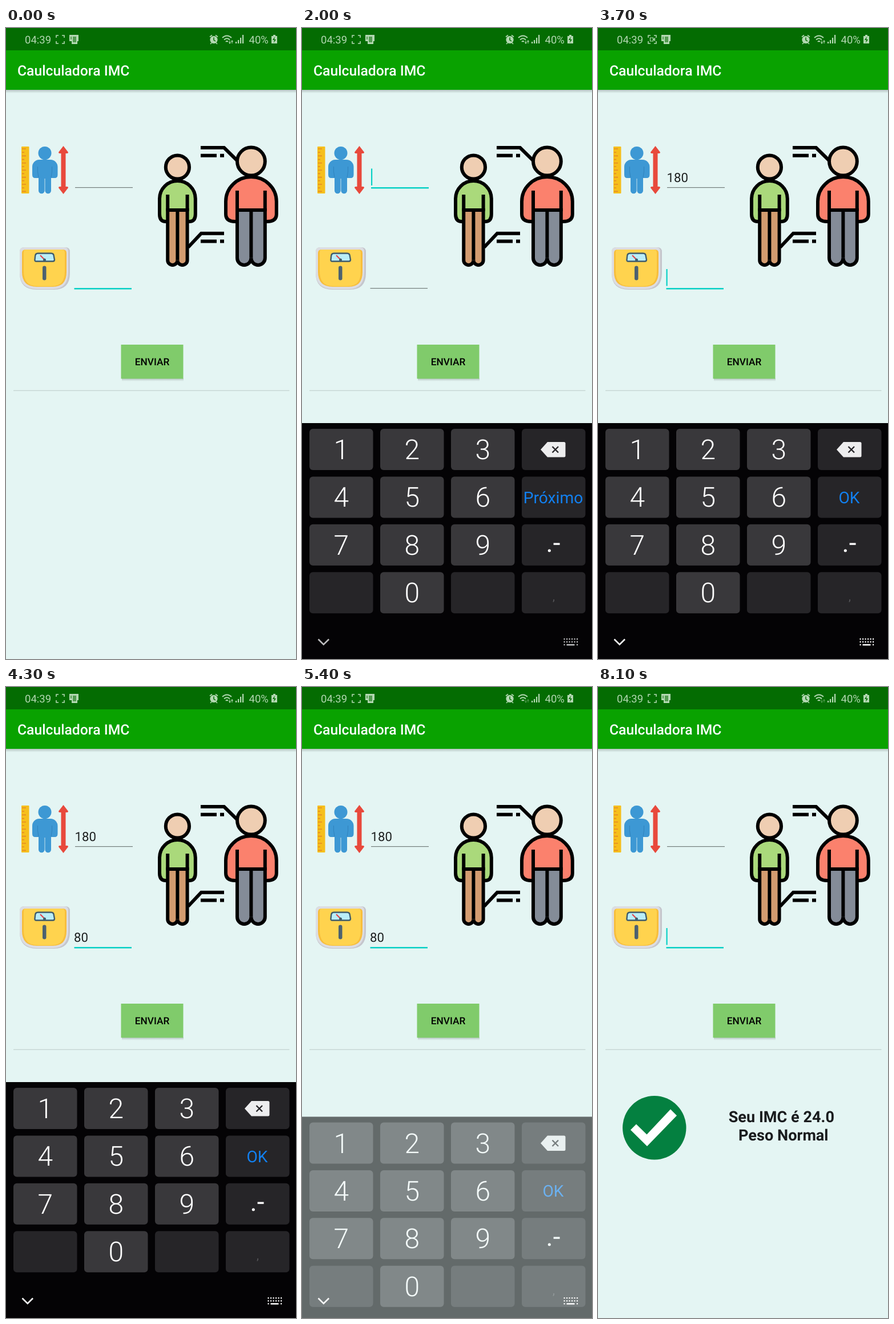
An HTML page that plays this animation: 508 px wide and 1102 px high, repeating every 8500 ms.

```html
<!DOCTYPE html>
<html lang="pt">
<head>
<meta charset="utf-8">
<title>Calculadora</title>
<style>
html, body { margin: 0; width: 100%; height: 100%; overflow: hidden; background: #e4f5f3; }
svg { display: block; width: 100vw; height: 100vh; }
text { font-family: Roboto, "Open Sans", sans-serif; text-rendering: geometricPrecision; white-space: pre; }
.mid { text-anchor: middle; }
.ink { fill: none; stroke: #000; stroke-width: 6; }
.status { fill: #b3d8b2; }
.status-line { fill: none; stroke: #b3d8b2; stroke-width: 1.6; }
.input { font-size: 22.2px; fill: #1c1f1f; }
.result { font-size: 27.1px; font-weight: 700; fill: #1a1c1e; text-anchor: middle; }
.digit { font-size: 48px; font-weight: 300; fill: #fff; text-anchor: middle; }
.action { font-size: 28.2px; fill: #1280f0; text-anchor: middle; }
</style>
</head>
<body>
<svg viewBox="0 0 508 1102" preserveAspectRatio="none">
  <defs>
    <linearGradient id="drop" x2="0" y2="1">
      <stop offset="0" stop-color="#000" stop-opacity=".2"/>
      <stop offset="1" stop-color="#000" stop-opacity="0"/>
    </linearGradient>
  </defs>
  <rect width="508" height="1102" fill="#e4f5f3"/>

  <!-- bars -->
  <rect y="108" width="508" height="6" fill="url(#drop)"/>
  <rect y="39" width="508" height="69" fill="#09a200"/>
  <rect width="508" height="39" fill="#046c02"/>
  <text x="20" y="83" font-size="24.7" font-weight="500" fill="#fff">Caulculadora IMC</text>
  <g class="status">
    <text x="33" y="27" font-size="18.5">04:39</text>
    <text x="425.5" y="27" font-size="18.5">40%</text>
    <path d="M111 12h16v11h-2v5h-10v-5h-4z"/>
    <path d="M113 15h2v5h-2zM117 15h6v10h-6z" fill="#046c02" opacity=".55"/>
    <circle cx="364" cy="20.5" r="6.6"/>
    <path d="M402 24h2.2v3H402zM406 21h2.2v6H406zM410 17h2.2v10H410zM414 12h2.2v15H414z"/>
    <path d="M468 12h4v2h3v13h-10V14h3z"/>
  </g>
  <path d="M364 16.500v4.500l3 2" fill="none" stroke="#046c02" stroke-width="1.500"/>
  <path d="M471 15l-4 6h3l-1 5 4-6h-3z" fill="#046c02"/>
  <g class="status-line">
    <path d="M88 17v-4h4M98 13h4v4M102 23v4h-4M92 27h-4v-4"/>
    <path d="M357 15.500l4-3M371 15.500l-4-3M360 26l-2 2M368 26l2 2"/>
    <path d="M379 17q8-7 16 0M382 20.500q5-4.500 10 0M385 24q2-2 4 0" stroke-width="2"/>
    <path id="arrows" d="M392 22v5m-1.500-2l1.500 2 1.500-2M396 27v-5m-1.500 2l1.500-2 1.500 2" stroke-width="1.100"/>
    <path id="rec" d="M91.500 17h5v6h-5zM97 20l2.500-2v4z" stroke-width="1.200"/>
  </g>

  <!-- height icon -->
  <rect x="27" y="207" width="13.500" height="82" rx="1" fill="#f6bf1c"/>
  <path id="ticks" stroke="#e58a25" stroke-width="1.600"/>
  <g fill="#3d98d4">
    <circle cx="68" cy="218.500" r="11.500"/>
    <path d="M58 230H78a12.500 12.500 0 0 1 12.500 12.500V256q0 6-5 6H79V284a5.300 5.300 0 0 1-10.600 0V263h-.8V284a5.300 5.300 0 0 1-10.600 0V262H51q-5 0-5-6V242.500A12.500 12.500 0 0 1 58 230z"/>
  </g>
  <path d="M55.500 242v9l1.500 10M80.500 242v9l-1.500 10" fill="none" stroke="#2f83bd" stroke-width="1"/>
  <path d="M100.500 206l8.500 11q0 2-2 2h-2.500v58h2.500q2 0 2 2l-8.500 11-8.500-11q0-2 2-2h2.500v-58H94q-2 0-2-2z" fill="#e8493c"/>

  <!-- scale icon -->
  <path d="M32 383H104q8 0 8 8V428q0 29-28 29H54q-30 0-30-29V391q0-8 8-8z" fill="#c5c6cd"/>
  <path d="M32 383H102q7 0 7 8V426q0 29-26 30H54q-30-1-30-29V391q0-8 8-8z" fill="#dcdde2"/>
  <path d="M34 387H100q6 0 6 6V426q0 26-24 26H54q-26 0-26-26V393q0-6 6-6z" fill="#f7be3c"/>
  <path d="M34 387H98q5 0 5 6V425q0 26-23 26H55q-24 0-24-26V393q0-6 3-6z" fill="#ffd34e"/>
  <path d="M56 393.500H79q5 0 5 6l1 5q0 3-3 3H53q-3 0-2.500-3l.5-5q0-6 5-6z" fill="#b9edf8" stroke="#3f5c6c" stroke-width="2.400"/>
  <path d="M60 397l8 8" stroke="#e3434a" stroke-width="2.200"/>
  <circle cx="67.500" cy="405" r="2.500" fill="#3f5c6c"/>
  <rect x="64" y="415.500" width="6.500" height="25" rx="3.200" fill="#4c6170"/>

  <!-- two figures -->
  <g id="people"></g>
  <path class="ink" d="M341 209H382L406 232.500M341 222.800h28M375 222.800h7M319 383L342 358.800H382M341 372.600h28M375 372.600h7"/>

  <!-- form -->
  <rect id="line0" x="121" width="101"/>
  <rect id="line1" x="119.500" width="100.500"/>
  <text id="field0" class="input" x="120.500" y="269"></text>
  <text id="field1" class="input" x="119" y="445"></text>
  <rect id="cursor" width="2.200" height="29.500" fill="#08d0c5"/>
  <rect x="203" y="612" width="108" height="5" fill="url(#drop)"/>
  <rect id="send" x="201.500" y="553" width="109" height="59.500"/>
  <text class="mid" x="256" y="589" font-size="17.260" font-weight="500">ENVIAR</text>
  <rect x="13" y="632.600" width="483.500" height="1.300" fill="#c5d4d1"/>

  <g id="result">
    <circle cx="98.800" cy="769.800" r="55.700" fill="#048040"/>
    <path d="M57 773.500L67 763.500 85.500 781.500 127 737.500 138 748.500 86 802z" fill="#fff"/>
    <text class="result" x="321.300" y="760">Seu IMC é 24.0</text>
    <text class="result" x="324.800" y="791.500">Peso Normal</text>
  </g>

  <!-- keyboard -->
  <g id="board">
    <rect y="690" width="508" height="560" fill="#040305"/>
    <g id="keys"></g>
    <path d="M418 736.300L430 723H459q2.500 0 2.500 2.500V747q0 2.500-2.500 2.500H430z" fill="#ededee"/>
    <path d="M438.500 731l10.500 10.500M449 731l-10.500 10.500" stroke="#262528" stroke-width="2.400"/>
    <text id="next" class="action" x="440" y="829.500"></text>
    <text class="digit" x="440" y="915" style="font-size:46px;font-weight:400">.-</text>
    <text class="mid" x="441" y="1000" font-size="20" fill="#57565a">,</text>
  </g>
  <g id="nav">
    <rect id="hide" x="10" y="1042" width="55" height="60" rx="18" fill="#353438"/>
    <path id="chevron" d="M28.500 1067.500l9.300 9.200 9.300-9.200" fill="none" stroke="currentColor" stroke-width="2.600"/>
    <path id="dots" fill="currentColor"/>
  </g>
</svg>
<script>
const LOOP = 8500;
const $ = id => document.getElementById(id);
const show = (id, on) => { $(id).style.display = on ? '' : 'none'; };
const set = (id, attrs) => { for (const k in attrs) $(id).setAttribute(k, attrs[k]); };
const within = (t, spans) => spans.some(([a, b]) => t >= a && t < b);

// A figure: centre, head y and radius, shoulder top, half widths of body and legs.
function figure({ x, headY, headR, top, half, leg, rise, arm, skin, shirt, pants }) {
  const l = x - half, r = x + half, a = x - leg, b = x + leg, foot = leg / 2;
  const body = `M${a} 338h-3.500Q${l} 338 ${l} 325V${top + rise}A${half} ${rise} 0 0 1 ${r} ${top + rise}V325Q${r} 338 ${b + 3.5} 338H${b}`;
  const legs = `M${a} 318H${b}V${414 - foot}a${foot} ${foot} 0 0 1 ${-leg} 0a${foot} ${foot} 0 0 1 ${-leg} 0z`;
  return `<path d="${body}z" fill="${shirt}"/><path class="ink" d="${body}"/>
    <path class="ink" style="fill:${pants}" d="${legs}"/>
    <path class="ink" d="M${x} 318V${414 - foot}M${a} ${arm}V320M${b} ${arm}V320"/>
    <circle class="ink" style="fill:${skin}" cx="${x}" cy="${headY}" r="${headR}"/>`;
}
$('people').innerHTML =
  figure({ x: 300.4, headY: 243, headR: 20.6, top: 267, half: 31.4, leg: 17.2, rise: 31, arm: 291,
    skin: '#efceb2', shirt: '#aad97b', pants: '#d39c70' }) +
  figure({ x: 429.4, headY: 233, headR: 24.4, top: 260, half: 44.4, leg: 24.4, rise: 43, arm: 284,
    skin: '#efceb2', shirt: '#fb816d', pants: '#848c98' });

let ticks = '';
for (let i = 0; i < 13; i++) ticks += `M28 ${211 + i * 6.2}h${i % 2 ? 4 : 7}`;
set('ticks', { d: ticks });

// Keys
const labels = ['1', '2', '3', '', '4', '5', '6', '', '7', '8', '9', '', '', '0', '', ''];
const keyFill = i => labels[i] ? '#39383b' : '#262528';
$('keys').innerHTML = labels.map((s, i) => {
  const x = 13 + (i % 4) * 124, y = 700 + Math.floor(i / 4) * 83.4;
  return `<rect id="key${i}" x="${x}" y="${y}" width="111.500" height="72" rx="6"/>
    <text class="digit" x="${x + 55.7}" y="${y + 53}">${s}</text>`;
}).join('');

let dots = '';
for (let i = 0; i < 6; i++) for (const y of [1066, 1071]) dots += `M${458.5 + i * 4.5} ${y}h2.200v2.200h-2.200z`;
set('dots', { d: dots + 'M458.500 1076h2.200v2.200h-2.200zM463.500 1076h14v2.400h-14zM481 1076h2.200v2.200h-2.200z' });

// [time, opacity, drop]
const slide = [[0, 0, 180], [1200, 0, 180], [1300, .13, 136], [1400, .55, 80], [1500, .85, 38],
  [1600, .97, 12], [1700, 1, 0], [5250, 1, 0], [5350, .75, 35], [5450, .4, 85], [5600, 0, 150], [LOOP, 0, 180]];
function boardAt(t) {
  const i = slide.findIndex(s => s[0] > t);
  const [a, b] = [slide[i - 1], slide[i]];
  const k = (t - a[0]) / (b[0] - a[0]);
  return [1, 2].map(n => a[n] + (b[n] - a[n]) * k);
}

// [key index, press, release]
const presses = [[0, 2100, 2300], [9, 2400, 2500], [13, 2600, 2800],
  [7, 3500, 3600], [9, 3800, 4000], [13, 4100, 4300]];
const typed = (s, times, t) => t >= 6100 ? '' : s.slice(0, times.filter(v => t >= v).length);
const blinks = [[400, 900], [1200, 1600], [2000, 2500], [2600, 2800], [3000, 3500], [3600, 4000],
  [4500, 5000], [5500, 6000], [6100, 6500], [7000, 7500], [8000, LOOP]];
const recording = t => t < 2000 ? within(t, [[400, 900], [1400, 1900]]) : t % 1000 >= 500;

function draw(t) {
  const active = t >= 1200 && t < 3600 ? 0 : 1;
  const values = [typed('180', [2200, 2500, 2700], t), typed('80', [3900, 4200], t)];
  values.forEach((v, i) => {
    const on = i === active, y = i ? 454 : 278;
    $('field' + i).textContent = v;
    set('line' + i, { y, height: on ? 2.5 : 1.2, fill: on ? '#08d0c5' : '#737d7b' });
  });
  const start = active ? 119.5 : 121;
  set('cursor', { x: start + values[active].length * 12.47, y: active ? 421 : 245.5 });
  show('cursor', within(t, blinks));
  show('rec', recording(t));
  $('arrows').style.opacity = t < 4500 || within(t, [[6500, 6700]]) ? 1 : .45;
  set('send', { fill: within(t, [[6000, 6200]]) ? '#73bb60' : '#80cb6b' });
  show('result', t >= 6100);

  const [alpha, drop] = boardAt(t);
  show('board', alpha > 0);
  set('board', { opacity: alpha, transform: `translate(0 ${drop})` });
  $('next').textContent = active ? 'OK' : 'Próximo';
  labels.forEach((_, i) => {
    const down = presses.some(([k, a, b]) => k === i && t >= a && t < b);
    set('key' + i, { fill: down ? '#59585c' : keyFill(i) });
  });
  show('nav', t >= 1200 && t < 5500);
  show('hide', within(t, [[5100, 5300]]));
  $('nav').style.color = alpha < .4 ? '#56625f' : t < 2300 ? '#bcbcbe' : '#fafafa';
}

function tick() {
  draw(performance.now() % LOOP);
  requestAnimationFrame(tick);
}
tick();
</script>
</body>
</html>
```
